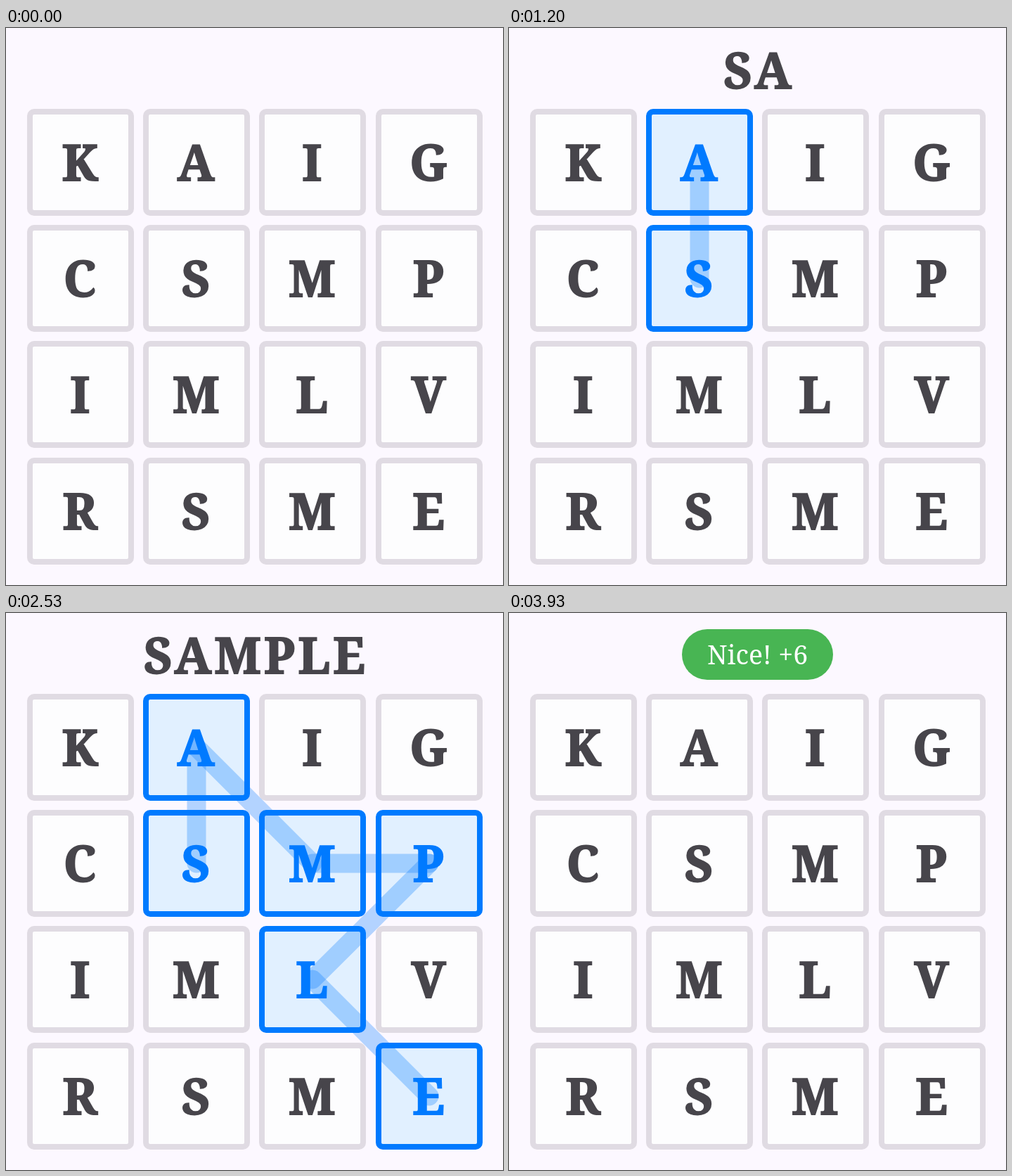
These frames come from a looping animation (707 px wide and 792 px high, 3990 ms). An HTML page:

```html
<!DOCTYPE html>
<html lang="en">
<head>
<meta charset="utf-8">
<title>Word grid</title>
<style>
  html, body { margin: 0; width: 100%; height: 100%; overflow: hidden; background: #fcf8ff; }
  svg { display: block; width: 707px; height: 792px; }
  text { font-family: "Noto Serif", serif; text-anchor: middle; }
  .tile rect { fill: #fdfdfe; stroke: #e0dbe3; stroke-width: 8; }
  .tile text, #word {
    font-size: 70px; font-weight: 700;
    fill: #47454b; stroke: #47454b; stroke-width: 1.8;
  }
  #word { letter-spacing: 4px; }
  .tile.on rect { fill: #e1f0ff; stroke: #007aff; }
  .tile.on text { fill: #007aff; stroke: #007aff; }
  #trail line {
    stroke: #007aff; stroke-width: 27; stroke-opacity: .29; stroke-linecap: round;
  }
  #banner rect { fill: #48b553; }
  #banner text { font-size: 37.5px; fill: #fff; }
</style>
</head>
<body>
<svg viewBox="0 0 707 792">
  <text id="word" x="355.5" y="85.7"></text>
  <g id="grid"></g>
  <g id="trail"></g>
  <g id="banner">
    <rect x="246" y="23" width="215" height="72" rx="36"/>
    <text x="353.5" y="73">Nice! +6</text>
  </g>
</svg>
<script>
const LOOP = 3990;
const LETTERS = "KAIGCSMPIMLVRSME";
const PATH = [5, 1, 6, 7, 10, 15];   // tile indices, in order of selection
const FIRST_PICK = 840, PICK_GAP = 270, RELEASE = 2642;
const PITCH = 165.4, SIZE = 152, BORDER = 8;

const $ = id => document.getElementById(id);

// Tiles sit on whole pixels.
const corner = i => ({
  x: Math.round(29.5 + (i % 4) * PITCH),
  y: Math.round(114.5 + Math.floor(i / 4) * PITCH)
});
const center = i => ({ x: corner(i).x + SIZE / 2, y: corner(i).y + SIZE / 2 });

$("grid").innerHTML = [...LETTERS].map((letter, i) => {
  const { x, y } = corner(i), inner = SIZE - BORDER;
  return `<g class="tile">
    <rect x="${x + BORDER / 2}" y="${y + BORDER / 2}" width="${inner}" height="${inner}" rx="6"/>
    <text x="${x + SIZE / 2 - .8}" y="${y + 101.7}">${letter}</text></g>`;
}).join("");
const tiles = [...document.querySelectorAll(".tile")];

// Separate strokes, so the joints darken where they overlap.
$("trail").innerHTML = PATH.slice(1).map((tile, k) => {
  const a = center(PATH[k]), b = center(tile);
  return `<line x1="${a.x}" y1="${a.y}" x2="${b.x}" y2="${b.y}"/>`;
}).join("");
const segments = [...document.querySelectorAll("#trail line")];

function showSelection(count) {
  const picked = PATH.slice(0, count);
  tiles.forEach((tile, i) => tile.classList.toggle("on", picked.includes(i)));
  segments.forEach((line, k) =>
    line.setAttribute("visibility", k + 1 < count ? "visible" : "hidden"));
  $("word").textContent = picked.map(i => LETTERS[i]).join("");
}

// Underdamped spring that rises into place and overshoots once.
function springOffset(t) {
  const decay = .0087, speed = .0157;
  return 40 * Math.exp(-decay * t) *
    (Math.cos(speed * t) + decay / speed * Math.sin(speed * t));
}

function render(t) {
  const released = t >= RELEASE;
  const count = Math.floor((t - FIRST_PICK) / PICK_GAP) + 1;
  showSelection(released ? 0 : Math.max(0, Math.min(PATH.length, count)));
  $("banner").setAttribute("visibility", released ? "visible" : "hidden");
  $("banner").setAttribute("transform", `translate(0 ${released ? springOffset(t - RELEASE) : 0})`);
}

const start = performance.now();
function tick() {
  render((performance.now() - start) % LOOP);
  requestAnimationFrame(tick);
}
tick();
</script>
</body>
</html>
```
